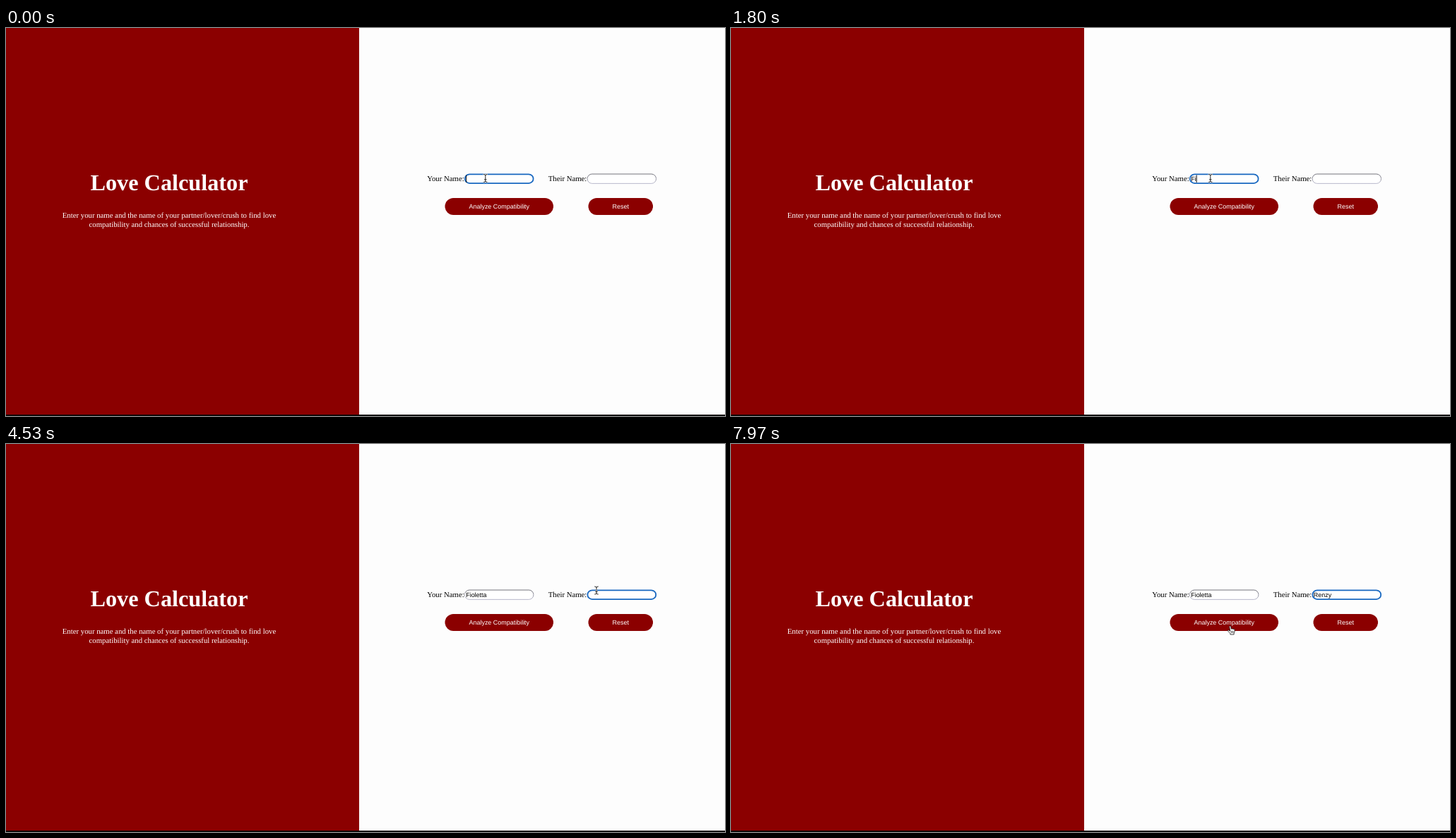
An HTML page for the animation above (8 s loop, 1018 px wide and 550 px high).

```html
<!DOCTYPE html>
<html lang="en">
<head>
<meta charset="utf-8">
<title>Love Calculator</title>
<style>
  html, body { margin: 0; width: 100%; height: 100%; overflow: hidden; background: #fdfdfd; }
  svg { display: block; width: 1018px; height: 550px; }
  text { text-rendering: geometricPrecision; white-space: pre; }
  .serif { font: 10.75px "Liberation Serif", Times, serif; }
  .title { font: bold 32.25px "Liberation Serif", Times, serif; }
  .sans { font: 8.96px "Liberation Sans", Arial, sans-serif; }
  .mid { text-anchor: middle; }
  .light { fill: #fff; }
</style>
</head>
<body>
<svg viewBox="0 0 1018 550" xmlns="http://www.w3.org/2000/svg">
  <defs>
    <linearGradient id="edge" x1="0" y1="0" x2="0" y2="1">
      <stop offset="0" stop-color="#707078"/>
      <stop offset="1" stop-color="#b9b9cc"/>
    </linearGradient>
  </defs>
  <rect width="1018" height="550" fill="#fdfdfd"/>
  <rect width="500" height="550" fill="#8b0000"/>
  <rect y="548" width="1018" height="2" fill="#100808"/>

  <text class="title mid light" x="231" y="230">Love Calculator</text>
  <g class="serif mid light">
    <text x="231" y="269">Enter your name and the name of your partner/lover/crush to find love</text>
    <text x="231" y="281.7">compatibility and chances of successful relationship.</text>
  </g>

  <g class="serif">
    <text x="596.3" y="217">Your Name:</text>
    <text x="767.7" y="217">Their Name:</text>
  </g>
  <g id="fields" class="sans"></g>

  <g fill="#8b0000">
    <rect x="621.5" y="241" width="153.5" height="24" rx="12"/>
    <rect x="824.5" y="241" width="91.5" height="24" rx="12"/>
  </g>
  <g class="sans mid light">
    <text x="698.3" y="256.2">Analyze Compatibility</text>
    <text x="870.2" y="256.2">Reset</text>
  </g>

  <g id="pointer" stroke-linejoin="round" stroke-linecap="round">
    <g id="beam" fill="none">
      <path d="M-2.3-5.5Q0-5.5 0-4Q0-5.5 2.3-5.5M0-4V4M-2.3 5.5Q0 5.5 0 4Q0 5.5 2.3 5.5M-1.3 1.8H1.3" stroke="#fff" stroke-width="2"/>
      <path d="M-2.3-5.5Q0-5.5 0-4Q0-5.5 2.3-5.5M0-4V4M-2.3 5.5Q0 5.5 0 4Q0 5.5 2.3 5.5M-1.3 1.8H1.3" stroke="#222"/>
    </g>
    <path id="arrow" d="M0 0V10.2L2.4 8L4.1 12L6 11.2L4.3 7.4H7.4Z" fill="#000" stroke="#fff" stroke-width=".8"/>
    <g id="hand" stroke="#111" stroke-width=".8">
      <path d="M-1.6 .6Q-.7-.8 .3 .6L1 4.2Q1.8 3.2 2.7 4.3Q3.6 3.5 4.3 4.6Q5.4 4.2 5.8 5.5Q6.1 8 4.8 10.2V12H-.4V10.6Q-2.4 8.8-4 6.6Q-3.8 5.2-2.4 6L-.8 7Z" fill="#fff"/>
      <path d="M.8 7.2V9.7M2.3 7.2V9.7M3.8 7.2V9.7" stroke-width=".6"/>
    </g>
  </g>
</svg>
<script>
const LOOP = 8000, CLICK = 4020;
const NS = "http://www.w3.org/2000/svg";
const $ = id => document.getElementById(id);

function add(tag, attrs) {
  const el = document.createElementNS(NS, tag);
  set(el, attrs);
  return $("fields").appendChild(el);
}
function set(el, attrs) {
  for (const k in attrs) el.setAttribute(k, attrs[k]);
}

// focus: interval in which the field is active; keys: time of each keystroke
function field(x, name, focus, keys) {
  return {
    x, name, focus, keys,
    box: add("rect", { fill: "#fff" }),
    label: add("text", { x: x + 2.2, y: 217 }),
    caret: add("rect", { y: 208.5, width: 1, height: 10.5, fill: "#111" })
  };
}
const fields = [
  field(649, "Fioletta", [0, CLICK], [1420, 1700, 1960, 2180, 2400, 2620, 2840, 3060]),
  field(822.6, "Renzy", [CLICK, LOOP], [5350, 5700, 6020, 6180, 6340])
];

function drawField(f, t) {
  const active = t >= f.focus[0] && t < f.focus[1];
  const typed = f.keys.filter(k => k <= t).length;
  const inset = active ? .8 : .5;
  set(f.box, {
    x: f.x + inset, y: 206.5 + inset,
    width: 98.4 - 2 * inset, height: 14.4 - 2 * inset, rx: 6.6,
    stroke: active ? "#1767c0" : "url(#edge)",
    "stroke-width": active ? 1.8 : 1
  });
  f.label.textContent = f.name.slice(0, typed);
  const last = typed ? f.keys[typed - 1] : f.focus[0];
  const lit = active && (t - last) % 1000 < 500;
  const width = typed ? f.label.getComputedTextLength() : 0;
  set(f.caret, { x: f.x + 2.2 + width, opacity: lit ? 1 : 0 });
}

const easeIn = k => k ** 1.5;
const easeOut = k => 1 - (1 - k) ** 1.5;
const smooth = k => k * k * (3 - 2 * k);

// pointer legs: start, end, from, to, easing
const home = [678.8, 213], bend = [804, 221], second = [836, 207.5], button = [707.3, 258];
const legs = [
  [3390, 3670, home, bend, easeIn],
  [3670, 3930, bend, second, easeOut],
  [6900, 7560, second, button, smooth]
];

function pointerAt(t) {
  let p = home;
  for (const [a, b, from, to, ease] of legs) {
    if (t < a) break;
    const k = ease(Math.min(1, (t - a) / (b - a)));
    p = from.map((v, i) => v + (to[i] - v) * k);
  }
  return p;
}

function pointerKind([x, y]) {
  if (y > 206 && y < 221 && fields.some(f => x > f.x && x < f.x + 98.4)) return "beam";
  if (y > 241 && y < 265 && x > 621.5 && x < 775) return "hand";
  return "arrow";
}

function draw(t) {
  fields.forEach(f => drawField(f, t));
  const p = pointerAt(t), kind = pointerKind(p);
  set($("pointer"), { transform: `translate(${p[0].toFixed(2)} ${p[1].toFixed(2)})` });
  for (const id of ["beam", "arrow", "hand"]) set($(id), { display: id === kind ? "inline" : "none" });
}

let start = null;
function tick(now) {
  if (start === null) start = now;
  draw((now - start) % LOOP);
  requestAnimationFrame(tick);
}
draw(0);
requestAnimationFrame(tick);
</script>
</body>
</html>
```
